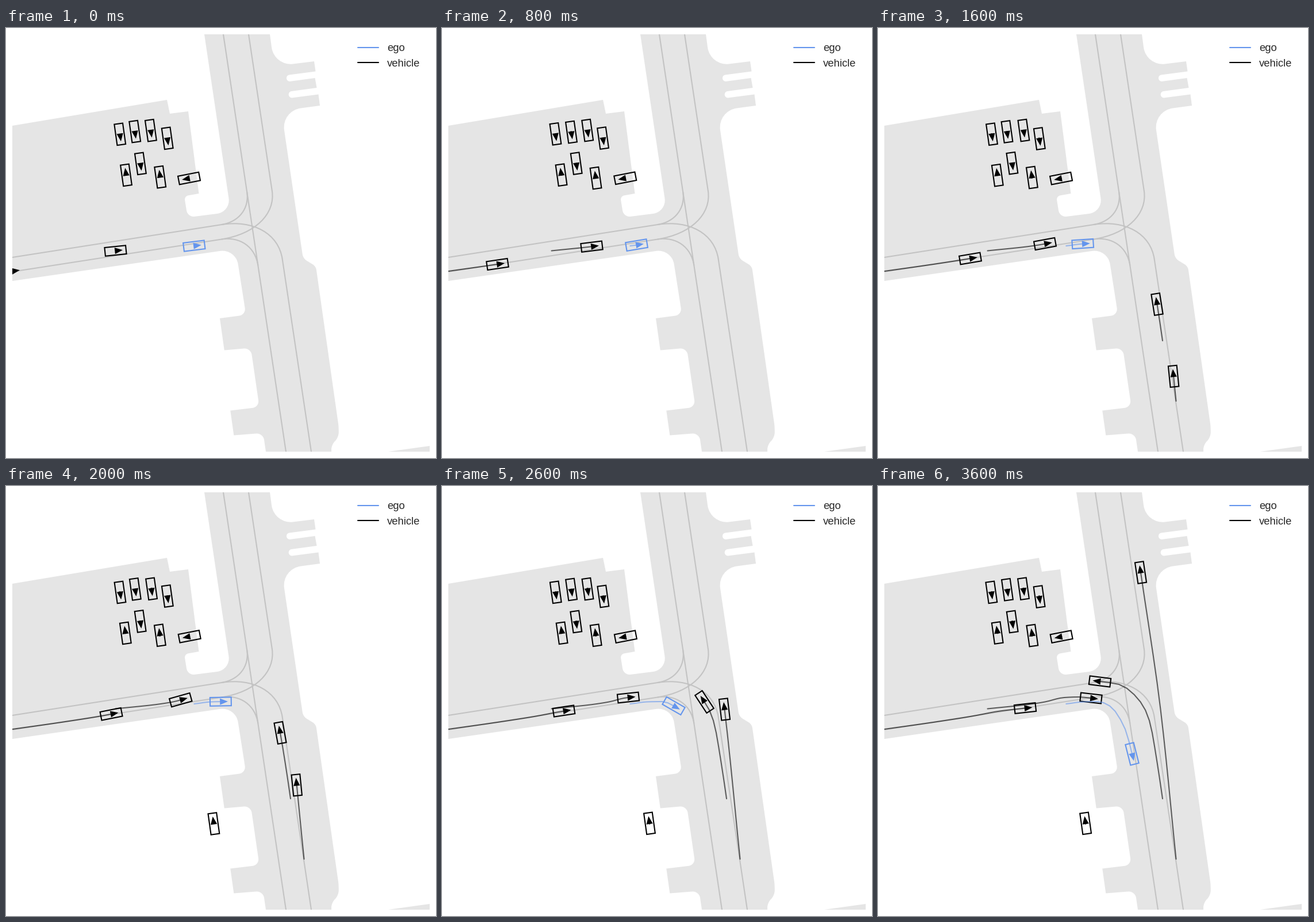
A matplotlib script for the animation above (3800 ms loop, 748 by 748 pixels).

```python
import numpy as np
import matplotlib.pyplot as plt
from matplotlib.animation import FuncAnimation
from matplotlib.patches import PathPatch, Polygon
from matplotlib.path import Path

SIZE, DPI = 748, 100
LO, HI = 11, 737
FRAMES, STEP = 19, 200
WIDTH = 1.5
AREA, LANE, EGO, CAR = "#e5e5e5", "#c3c3c3", "#6495ed", "black"
BOX = [(-18.4, -7.4), (18.4, -7.4), (18.4, 7.4), (-18.4, 7.4)]
HEAD = [(-1.2, -5.6), (12.6, 0), (-1.2, 5.6)]

plt.rcParams.update({"font.family": "Liberation Sans",
                     "lines.solid_capstyle": "round",
                     "lines.linewidth": WIDTH})
rng = np.random.default_rng(4)
fig = plt.figure(figsize=(SIZE / DPI, SIZE / DPI), dpi=DPI, facecolor="white")
span = (HI - LO) / SIZE
ax = fig.add_axes([LO / SIZE, 1 - HI / SIZE, span, span])
ax.set_xlim(LO, HI)
ax.set_ylim(HI, LO)
ax.axis("off")


# ---- map: corners are (x, y) or (x, y, rounding distance)

def driveway(top, bottom, depth):
    """Side bay cut into the west kerb."""
    x1, x2 = (417.5 + 0.145 * (y - 499) for y in (top, bottom))
    back = x1 - depth
    return [(x1, top, 12), (back, top + 6),
            (back + 0.135 * (bottom - top), bottom + 4), (x2, bottom, 12)]


def slot(y, low, high):
    """Narrow round-ended gap between two east bays."""
    x = 492.5 + 0.13 * (y - 115.5)
    return [(low, y), (x, y + 6.6, 5.5), (x - 1.5, y - 4.8, 5.5),
            (high, y - 11.5)]


def rounded(corners):
    pts = [np.array(c[:2], float) for c in corners]
    verts, codes = [], []
    for i, (here, corner) in enumerate(zip(pts, corners)):
        if len(corner) == 2:
            verts.append(here)
            codes.append(Path.LINETO)
            continue
        before, after = (
            (other - here) * corner[2] / np.hypot(*(other - here))
            for other in (pts[i - 1], pts[(i + 1) % len(pts)]))
        verts += [here + before, here + 0.45 * before,
                  here + 0.45 * after, here + after]
        codes += [Path.LINETO] + [Path.CURVE4] * 3
    codes[0] = Path.MOVETO
    return Path(verts + [verts[0]], codes + [Path.CLOSEPOLY])


def road_outline():
    lot = [(391, 320, 24), (316, 329.5, 12), (310, 292.5, 7), (335.5, 288),
           (317, 145), (285, 149), (280, 125), (LO, 170)]
    west = [(LO, 440), (399.5, 384, 27),
            *driveway(499, 556.5, 45.5), *driveway(659.5, 704.5, 50.5)]
    south = [(452, HI), (566, HI), (566, 725, 8), (579, 712, 9), (578.5, 692, 5)]
    east = [(539, 414.5, 6), (516.8, 401, 7), (479, 144, 34), (546, 135),
            *slot(115.5, 543.5, 540.5), *slot(87, 537.5, 538.5),
            (536, 58), (466.5, 66.6, 33)]
    return [(345, LO), *lot, *west, *south, *east, (459, LO)]


def meet(a, b):
    """Point where lanes a and b cross when extended."""
    (p, q), (r, s) = np.array(a, float), np.array(b, float)
    k, _ = np.linalg.solve(np.column_stack([q - p, r - s]), r - p)
    return p + k * (q - p)


def draw_map():
    ax.add_patch(PathPatch(rounded(road_outline()), fc=AREA, ec="none", zorder=1))
    ax.add_patch(Polygon([(665, HI), (HI, 727), (HI, HI)],
                         fc=AREA, ec="none", zorder=1))

    down, up = [(378, LO), (487, HI)], [(422, LO), (531, HI)]
    out, into = [(LO, 399), (375, 342)], [(LO, 424), (375, 367.5)]
    for line in (down, [up[0], (462.8, 283)], [(480.7, 402), up[1]], out, into):
        ax.plot(*zip(*line), color=LANE, zorder=2)

    # each turn bends from a side lane towards the corner and on to the road
    codes = [Path.MOVETO] + [Path.CURVE4] * 3
    for side, road, y in ((out, down, 285), (out, up, 402),
                          (into, up, 283), (into, down, 413)):
        start, corner = np.array(side[1]), meet(side, road)
        end = np.array([np.interp(y, (LO, HI), (road[0][0], road[1][0])), y])
        verts = [start, start + 0.59 * (corner - start),
                 end + 0.59 * (corner - end), end]
        ax.add_patch(PathPatch(Path(verts, codes), fill=False, ec=LANE,
                               lw=WIDTH, zorder=2))


# ---- vehicles

def glide(t, keys, vals):
    """Smooth curve through keyed values that never overshoots them."""
    keys, vals = np.array(keys, float), np.array(vals, float)
    sec = np.diff(vals) / np.diff(keys)
    prod, total = sec[1:] * sec[:-1], sec[1:] + sec[:-1]
    inner = np.where(prod > 0, 2 * prod / np.where(prod > 0, total, 1), 0)
    slope = np.concatenate([sec[:1], inner, sec[-1:]])
    i = np.clip(np.searchsorted(keys, t, side="right") - 1, 0, len(keys) - 2)
    h = keys[i + 1] - keys[i]
    u = (t - keys[i]) / h
    return ((1 + 2 * u) * (1 - u) ** 2 * vals[i]
            + u * (1 - u) ** 2 * h * slope[i]
            + u * u * (3 - 2 * u) * vals[i + 1]
            + u * u * (u - 1) * h * slope[i + 1])


def drive(*keys):
    """Track through (step, x, y) points, heading slightly behind the motion."""
    steps, xs, ys = zip(*keys)
    t = np.arange(steps[0], FRAMES)
    x, y = glide(t, steps, xs), glide(t, steps, ys)
    a, b = (np.clip(t + d, steps[0], steps[-1]) for d in (-0.8, 0.2))
    deg = np.degrees(np.arctan2(glide(b, steps, ys) - glide(a, steps, ys),
                                glide(b, steps, xs) - glide(a, steps, xs)))
    return steps[0], x, y, deg


def park(x, y, deg, first=0):
    """Standing car whose measured place wanders by a fraction of a pixel."""
    n = FRAMES - first
    noise = rng.normal(0, 0.9, (2, n + 3))
    dx, dy = (np.convolve(row, np.ones(4) / 4, "valid") for row in noise)
    return first, x + dx, y + dy, np.full(n, deg)


def placed(shape, x, y, deg):
    a = np.radians(deg)
    spin = np.array([[np.cos(a), np.sin(a)], [-np.sin(a), np.cos(a)]])
    return np.array(shape) @ spin + (x, y)


class Vehicle:
    def __init__(self, track, color=CAR, z=4):
        self.first, self.x, self.y, self.deg = track
        self.trail, = ax.plot([], [], color=color, alpha=0.6, zorder=z)
        self.box = Polygon(BOX, fill=False, ec=color, lw=WIDTH, zorder=z + 0.1)
        self.head = Polygon(HEAD, fc=color, ec="none", zorder=z + 0.2)
        ax.add_patch(self.box)
        ax.add_patch(self.head)

    def show(self, step):
        i = step - self.first
        for part in (self.trail, self.box, self.head):
            part.set_visible(i >= 0)
        if i < 0:
            return
        pose = self.x[i], self.y[i], self.deg[i]
        outline = placed(BOX, *pose)
        self.trail.set_data(self.x[:i + 1], self.y[:i + 1])
        self.head.set_xy(placed(HEAD, *pose))
        self.box.set_xy(outline)
        # a box cut by the view edge is not drawn
        self.box.set_visible(bool(outline.min() >= LO))


draw_map()

DOWN, UP = 82, -98
parked = [park(x, y, DOWN) for x, y in
          ((197.9, 184.8), (224.6, 180.5), (253, 178), (280.6, 191.8), (233.5, 235.8))]
parked += [park(208, 255.4, UP), park(267.8, 259.8, UP), park(319, 261.5, 169),
           park(361.3, 587.4, UP, first=10)]

traffic = [
    drive((0, 11.5, 423), (4, 96.5, 411), (8, 160.5, 401),
          (13, 212, 391.5), (18, 256, 386.5)),
    drive((0, 190.5, 387.5), (4, 260.5, 380.2), (8, 290.5, 375.5),
          (13, 324, 368), (16, 349.5, 367), (18, 370.5, 369)),
    drive((6, 495, 544), (8, 485.5, 480.5), (11, 472, 408),
          (13, 456.5, 375.5), (16, 419, 345), (18, 386, 340)),
    drive((7, 518.5, 649), (13, 491.5, 388.5), (18, 457, 150.5)),
]
ego = drive((0, 327.3, 379), (2, 337, 377.8), (5, 339.5, 377.4), (8, 356.2, 375.5),
            (11, 383, 375), (13, 403, 382.5), (16, 430, 423), (18, 442, 466))

cars = [Vehicle(track) for track in parked + traffic] + [Vehicle(ego, EGO, 5)]

keys = [ax.plot([], [], color=color, label=name)[0]
        for name, color in (("ego", EGO), ("vehicle", CAR))]
ax.legend(handles=keys, loc="upper right", frameon=False, fontsize=13.2,
          labelcolor="#262626")


def update(step):
    for car in cars:
        car.show(step)
    return []


anim = FuncAnimation(fig, update, frames=FRAMES, interval=STEP,
                     repeat=True, repeat_delay=0, blit=False)
plt.show()
```
